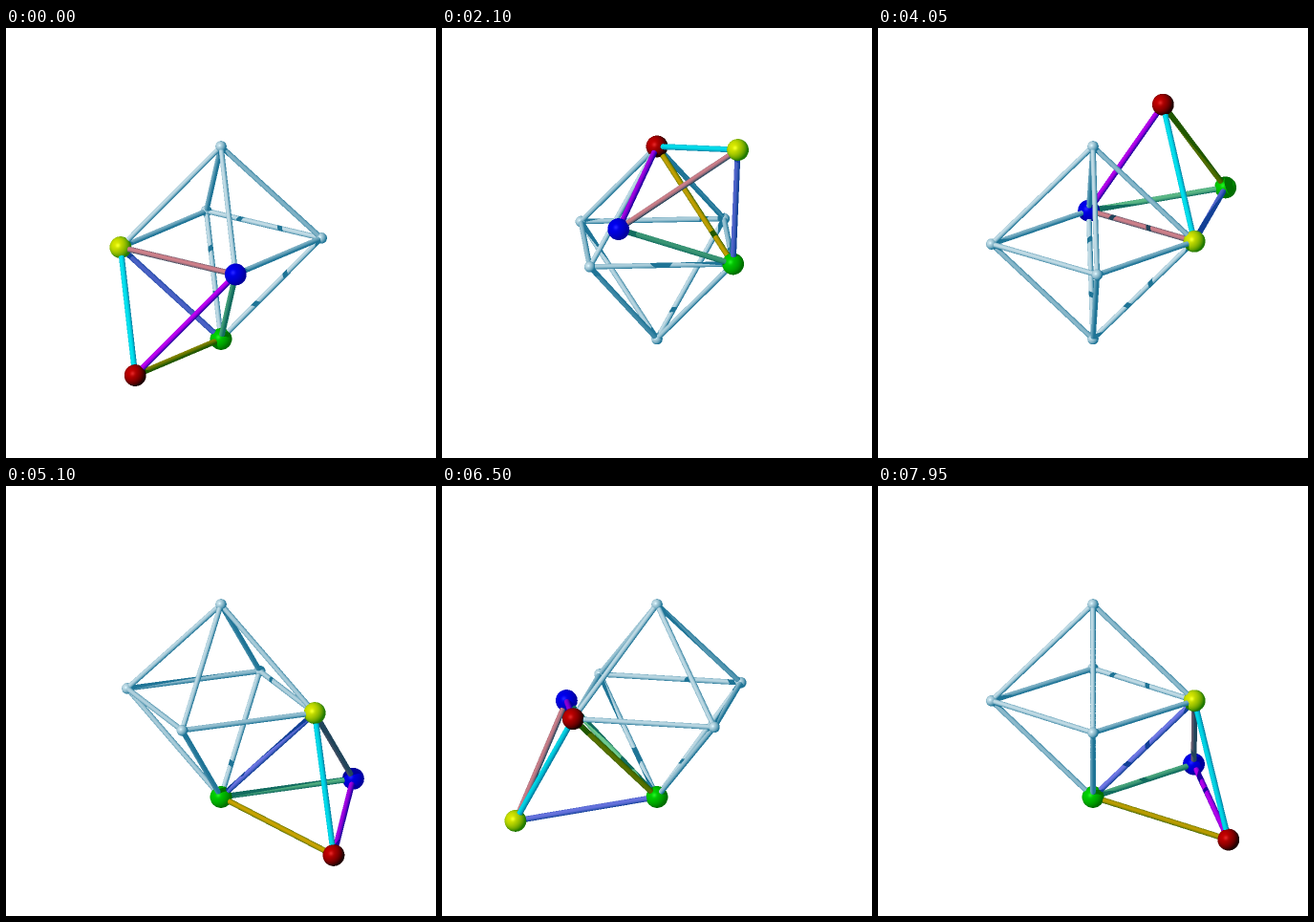
An HTML page with a canvas for the animation above (8 s loop, 450 by 450 pixels).

```html
<!DOCTYPE html>
<html lang="en">
<head>
<meta charset="utf-8">
<title>Tetrahedron rolling over an octahedron</title>
<style>
  html, body { margin: 0; width: 100%; height: 100%; overflow: hidden; background: #fff; }
  canvas { display: block; width: 450px; height: 450px; }
</style>
</head>
<body>
<canvas id="stage" width="900" height="900"></canvas>
<script>
const SCALE = 2, SIZE = 450 * SCALE;
const CENTER = [225, 224.7], RADIUS = 106.2;
const LOOP = 8000, STEP = 50, STEPS_PER_ROLL = 19;
const DEG = Math.PI / 180;
const TILT = Math.atan(1 / 3);
const ALPHA = Math.atan(Math.SQRT2);

// Each letter is the corner on top before a roll; the next letter is the one lifted by it.
const ROLLS = 'RGYBGRBYRB';

const AMBIENT = [0.14, 0.5, 0.62], DIFFUSE = [0.75, 0.45, 0.33];
const FRAME_COLOR = [0.86, 0.91, 0.95];
const BALLS = { R: [0.86, 0, 0], Y: [0.95, 0.95, 0], B: [0, 0, 0.98], G: [0, 0.86, 0] };
const EDGES = {
  RY: [0, 0.95, 1], RB: [0.86, 0, 1], RG: [0.9, 0.68, 0],
  YB: [0.92, 0.53, 0.57], YG: [0.5, 0.5, 0.95], BG: [0.5, 0.85, 0.6]
};

// Vectors: x right, y up, z towards the viewer.
const add = (...vs) => vs.reduce((a, b) => a.map((x, i) => x + b[i]));
const mul = (v, k) => v.map(x => x * k);
const dot = (a, b) => a[0] * b[0] + a[1] * b[1] + a[2] * b[2];
const unit = v => mul(v, 1 / Math.sqrt(dot(v, v)));
const toCamera = ([x, y, z]) => [
  x,
  y * Math.cos(TILT) - z * Math.sin(TILT),
  y * Math.sin(TILT) + z * Math.cos(TILT)
];

const VIEW = [0, 0, 1];
const LIGHT = unit(toCamera([-0.6885, 0.8335, 1]));
const HALF = unit(add(LIGHT, VIEW));

// A ball is a tube without length.
const ball = (p, r, color) =>
  ({ a: mul(p, RADIUS), b: mul(p, RADIUS), u: [0, 0, 0], len: 0, r, color });
function tube(p, q, r, color) {
  const a = mul(p, RADIUS), b = mul(q, RADIUS), d = add(b, mul(a, -1));
  return { a, b, u: unit(d), len: Math.sqrt(dot(d, d)), r, color };
}

function octahedron(step) {
  const turn = 22.5 / STEPS_PER_ROLL * (7 - step) * DEG;
  const ring = [0, 1, 2, 3].map(k => {
    const angle = turn + k * Math.PI / 2;
    return toCamera([Math.sin(angle), 0, Math.cos(angle)]);
  });
  const top = toCamera([0, 1, 0]);
  return { ring, top, bottom: mul(top, -1) };
}

function tetrahedron({ ring, bottom }, step) {
  const pos = { Y: ring[3], B: ring[0], G: bottom, R: add(ring[3], ring[0], bottom) };
  const current = Math.floor(step / STEPS_PER_ROLL);
  for (let k = 0; k <= current; k++) {
    const roll = (k < current ? 180 : 10 * (step % STEPS_PER_ROLL)) * DEG;
    const lead = ROLLS[k], trail = ROLLS[k + 1];
    const [h1, h2] = [...'RYBG'].filter(c => c !== lead && c !== trail).map(c => pos[c]);
    const hinge = add(h1, h2), ahead = mul(pos[trail], -1);
    const swing = angle => add(
      mul(hinge, 0.5 + Math.sqrt(0.75) * Math.cos(angle)),
      mul(ahead, Math.sqrt(1.5) * Math.sin(angle))
    );
    pos[lead] = swing(roll - ALPHA);
    pos[trail] = swing(roll - Math.PI + ALPHA);
  }
  return pos;
}

function buildScene(step) {
  const oct = octahedron(step), { ring, top, bottom } = oct;
  const pos = tetrahedron(oct, step);
  const solids = [top, bottom, ...ring].map(p => ball(p, 5.8, FRAME_COLOR));
  ring.forEach((p, k) => {
    for (const q of [top, bottom, ring[(k + 1) % 4]]) solids.push(tube(p, q, 2.75, FRAME_COLOR));
  });
  for (const c in BALLS) solids.push(ball(pos[c], 11.4, BALLS[c]));
  for (const e in EDGES) solids.push(tube(pos[e[0]], pos[e[1]], 3, EDGES[e]));
  return solids;
}

// Distance at which a ray leaves the solid, or -Infinity when it misses.
function exitDistance({ a, u, len, r }, x, y, z, d) {
  const mx = x - a[0], my = y - a[1], mz = z - a[2];
  const du = d[0] * u[0] + d[1] * u[1] + d[2] * u[2];
  const mu = mx * u[0] + my * u[1] + mz * u[2];
  const A = 1 - du * du;
  const B = mx * d[0] + my * d[1] + mz * d[2] - mu * du;
  const C = mx * mx + my * my + mz * mz - mu * mu - r * r;
  const disc = B * B - A * C;
  if (disc < 0 || A < 1e-9) return -Infinity;
  const t = (Math.sqrt(disc) - B) / A, s = mu + t * du;
  return s < 0 || s > len ? -Infinity : t;
}

const ctx = document.getElementById('stage').getContext('2d');
const image = ctx.createImageData(SIZE, SIZE);
const depth = new Float32Array(SIZE * SIZE);
const owner = new Int8Array(SIZE * SIZE);
const sceneX = i => (i + 0.5) / SCALE - CENTER[0];
const sceneY = j => CENTER[1] - (j + 0.5) / SCALE;

function findVisible(solids) {
  depth.fill(-Infinity);
  owner.fill(-1);
  solids.forEach((solid, id) => {
    const { a, b, r } = solid;
    const x0 = Math.floor((Math.min(a[0], b[0]) - r + CENTER[0]) * SCALE);
    const x1 = Math.ceil((Math.max(a[0], b[0]) + r + CENTER[0]) * SCALE);
    const y0 = Math.floor((CENTER[1] - Math.max(a[1], b[1]) - r) * SCALE);
    const y1 = Math.ceil((CENTER[1] - Math.min(a[1], b[1]) + r) * SCALE);
    for (let j = y0; j <= y1; j++) {
      for (let i = x0; i <= x1; i++) {
        const z = exitDistance(solid, sceneX(i), sceneY(j), 0, VIEW);
        const n = j * SIZE + i;
        if (z > depth[n]) { depth[n] = z; owner[n] = id; }
      }
    }
  });
}

function shade(solids, id, x, y, z, offset) {
  const { a, u, len, r, color } = solids[id];
  const m = [x - a[0], y - a[1], z - a[2]], s = dot(m, u);
  const normal = m.map((c, k) => (c - s * u[k]) / r);
  let lit = Math.max(0, dot(normal, LIGHT));
  if (lit > 0 && solids.some((o, k) => k !== id && exitDistance(o, x, y, z, LIGHT) > 0.01)) lit = 0;
  const gloss = lit && !len ? 0.15 * Math.pow(Math.max(0, dot(normal, HALF)), 50) : 0;
  for (let k = 0; k < 3; k++) {
    image.data[offset + k] = 255 * (color[k] * (AMBIENT[k] + DIFFUSE[k] * lit) + gloss);
  }
}

function render(step) {
  const solids = buildScene(step);
  findVisible(solids);
  image.data.fill(255);
  for (let n = 0; n < owner.length; n++) {
    if (owner[n] < 0) continue;
    const i = n % SIZE, j = (n - i) / SIZE;
    shade(solids, owner[n], sceneX(i), sceneY(j), depth[n], n * 4);
  }
  ctx.putImageData(image, 0, 0);
}

let shown = -1;
function tick() {
  const step = Math.floor(performance.now() % LOOP / STEP);
  if (step !== shown) render(shown = step);
  requestAnimationFrame(tick);
}
tick();
</script>
</body>
</html>
```
